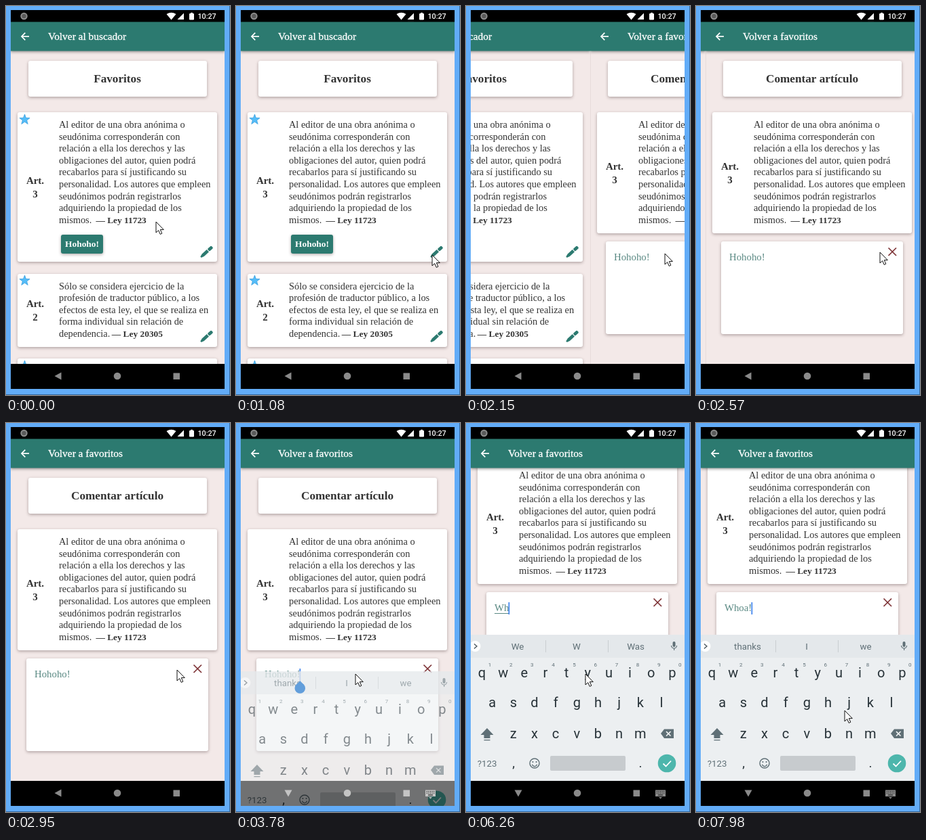
Recreate the animation shown at these times as an HTML page with a canvas. Size 330x575 px, loop 8 s.

```html
<!DOCTYPE html>
<html lang="es">
<head>
<meta charset="utf-8">
<title>Favoritos</title>
<style>
html, body { margin: 0; width: 100%; height: 100%; overflow: hidden; background: #62acf8; }
canvas { display: block; }
</style>
</head>
<body>
<canvas id="stage" width="330" height="575"></canvas>
<script>
const ctx = document.getElementById('stage').getContext('2d');
const LOOP = 8000;
const SERIF = '"Liberation Serif", serif', SANS = 'Roboto, sans-serif';
const TEAL = '#2c7a70', INK = '#333', PAPER = '#f3e9e8', CROSS = '#7f3538';
const ARTICLE_3 = [
  'Al editor de una obra anónima o', 'seudónima corresponderán con',
  'relación a ella los derechos y las', 'obligaciones del autor, quien podrá',
  'recabarlos para sí justificando su', 'personalidad. Los autores que empleen',
  'seudónimos podrán registrarlos', 'adquiriendo la propiedad de los', 'mismos.  '];
const ARTICLE_2 = [
  'Sólo se considera ejercicio de la', 'profesión de traductor público, a los',
  'efectos de esta ley, el que se realiza en', 'forma individual sin relación de',
  'dependencia. '];

// Timed states: [start, value]
const FIELD = [[0, 'Hohoho!'], [4620, 'Hohoho'], [5100, 'Hohoh'], [5170, 'Hoho'],
  [5240, 'Hoh'], [5310, 'Ho'], [5390, 'H'], [5470, ''], [5910, 'W'],
  [6230, 'Wh'], [6270, 'Who'], [6320, 'Whoa'], [6800, 'Whoa!']];
const CARET = [[0, false], [3580, true], [4520, false], [4620, true], [5750, false],
  [5910, true], [7310, false], [7740, true]];
const IDLE_WORDS = ['thanks', 'I', 'we'];
const WORDS = [[0, IDLE_WORDS], [6000, ['We', 'W', 'Was']],
  [6340, ['Who', 'Whoa', "Whoa's"]], [6840, IDLE_WORDS]];
const POINTER = [[0, 221, 319], [380, 221, 319], [1180, 292, 370], [1280, 292, 370],
  [1530, 296, 366], [1940, 296, 366], [2150, 293, 366], [2570, 271, 364],
  [2760, 266, 364], [3510, 176, 371], [7700, 176, 371], [7980, 219, 425]];

const clamp = v => Math.max(0, Math.min(1, v));
const phase = (t, from, to) => clamp((t - from) / (to - from));
const smooth = u => u * u * (3 - 2 * u);
const stateAt = (list, t) => list.reduce((value, [start, next]) => t >= start ? next : value, null);

function pointerAt(t) {
  let i = 1;
  while (i < POINTER.length - 1 && t > POINTER[i][0]) i++;
  const [t0, x0, y0] = POINTER[i - 1], [t1, x1, y1] = POINTER[i];
  const u = smooth(phase(t, t0, t1));
  return [Math.round(x0 + (x1 - x0) * u), Math.round(y0 + (y1 - y0) * u)];
}

function text(str, x, y, size, color = INK, { bold = '', family = SERIF, align = 'left' } = {}) {
  ctx.font = `${bold} ${size}px ${family}`;
  ctx.textAlign = align;
  ctx.fillStyle = color;
  ctx.fillText(str, x, y);
  return ctx.measureText(str).width;
}
const sans = (str, x, y, size, color) =>
  text(str, x, y, size, color, { family: SANS, align: 'center' });
const heading = (str, x, y, size) => text(str, x, y, size, INK, { bold: 'bold', align: 'center' });

function rect(x, y, w, h, color) {
  ctx.fillStyle = color;
  ctx.fillRect(x, y, w, h);
}
function roundRect(x, y, w, h, r, color) {
  ctx.fillStyle = color;
  ctx.beginPath();
  ctx.roundRect(x, y, w, h, r);
  ctx.fill();
}
function disc(x, y, r, color) {
  ctx.fillStyle = color;
  ctx.beginPath();
  ctx.arc(x, y, r, 0, 7);
  ctx.fill();
}
function path(points, close) {
  ctx.beginPath();
  for (let i = 0; i < points.length; i += 2) ctx.lineTo(points[i], points[i + 1]);
  if (close) ctx.closePath();
}
function poly(points, color) {
  path(points, true);
  ctx.fillStyle = color;
  ctx.fill();
}
function line(points, color, width = 1) {
  path(points);
  ctx.strokeStyle = color;
  ctx.lineWidth = width;
  ctx.stroke();
}
function layer(draw) {
  ctx.save();
  draw();
  ctx.restore();
}
function clip(x, y, w, h) {
  ctx.beginPath();
  ctx.rect(x, y, w, h);
  ctx.clip();
}
function card(x, y, w, h, color = '#fff', r = 3) {
  layer(() => {
    ctx.shadowColor = 'rgba(60,40,40,.38)';
    ctx.shadowBlur = 4;
    ctx.shadowOffsetY = 1.5;
    roundRect(x, y, w, h, r, color);
  });
}

function star(x, y) {
  const points = [];
  for (let i = 0; i < 10; i++) {
    const r = i % 2 ? 3.3 : 8, a = i * Math.PI / 5 - Math.PI / 2;
    points.push(x + r * Math.cos(a), y + r * Math.sin(a));
  }
  poly(points, '#55bdf8');
  ctx.strokeStyle = '#3c9fdd';
  ctx.lineWidth = .8;
  ctx.stroke();
}

function pencil(x, y, alpha = 1) {
  layer(() => {
    ctx.globalAlpha = alpha;
    ctx.translate(x, y);
    ctx.rotate(-.74);
    poly([-11.5, -1, -7, -2.4, 2.5, -2.4, 2.5, 2.4, -7, 2.4, -11.5, 1], TEAL);
    roundRect(3.6, -2.4, 7.6, 4.8, 1.5, TEAL);
  });
}

function article(lines, law, number, top, labelY) {
  let width = 0;
  lines.forEach((str, i) => { width = text(str, 78, top + i * 17.6, 14.35); });
  text('— Ley ' + law, 78 + width - 1, top + (lines.length - 1) * 17.6, 13.4, INK, { bold: 'bold' });
  heading('Art.', 43, labelY, 15);
  heading(number, 43, labelY + 20, 15);
}

function header(title) {
  layer(() => {
    ctx.shadowColor = 'rgba(0,0,0,.4)';
    ctx.shadowBlur = 4;
    ctx.shadowOffsetY = 1;
    rect(7, 23, 315, 43.5, TEAL);
  });
  line([34, 45, 23, 45], '#fff', 1.7);
  line([28.3, 39.7, 23, 45, 28.3, 50.3], '#fff', 1.7);
  text(title, 62, 50, 15.4, '#fff');
  ctx.strokeStyle = '#fff';
  ctx.lineWidth = .3;
  ctx.strokeText(title, 62, 50);
}

function favorites(pressed) {
  rect(7, 23, 315, 506, PAPER);
  card(33, 81, 263, 53);
  heading('Favoritos', 164, 113, 17.2);
  card(17, 157, 294, 221);
  star(27.5, 168);
  article(ARTICLE_3, '11723', '3', 180, 263);
  card(81, 338, 62, 28, TEAL);
  text('Hohoho!', 112, 356, 13.4, '#fff', { bold: 'bold', align: 'center' });
  pencil(295.5, 363.5, 1 - pressed * .5);
  card(17, 396, 294, 108);
  star(27.5, 406);
  article(ARTICLE_2, '20305', '2', 418.5, 445);
  pencil(295.5, 488.5);
  card(17, 521, 294, 60);
  star(27.5, 532);
  header('Volver al buscador');
}

function comments(t, scroll) {
  rect(7, 23, 315, 506, PAPER);
  layer(() => {
    ctx.translate(0, -scroll);
    card(33, 81, 263, 53);
    heading('Comentar artículo', 164, 113, 17.2);
    card(17, 157, 294, 179);
    article(ARTICLE_3, '11723', '3', 180, 242);
    card(30, 348, 268, 137);
    const value = stateAt(FIELD, t);
    const width = text(value, 42, 376, 14.8, '#5a8983');
    const composing = t >= 4620 && t < 6800;
    if (composing) rect(42, 379, width, 1, '#5a8983');
    if (stateAt(CARET, t)) rect(Math.round(41.5 + width) - .5, 363, 1.7, 18, '#3c82ee');
    line([276.5, 357.5, 288, 369], CROSS, 1.7);
    line([288, 357.5, 276.5, 369], CROSS, 1.7);
  });
  header('Volver a favoritos');
}

function caretHandle(scroll) {
  const y = 392 - scroll;
  poly([94.3, y - 11, 100, y - 5, 88.6, y - 5], '#629edb');
  disc(94.3, y, 7.8, '#629edb');
}

function keyRow(letters, x, y, caps) {
  [...letters].forEach((key, i) =>
    sans(caps ? key.toUpperCase() : key, x + i * 31.15, y, 20, '#273238'));
}

function keyboard(t) {
  const grey = '#5f6f76', caps = t >= 6730 && t < 6870;
  rect(7, 313, 315, 253, '#eceff1');
  rect(7, 313, 315, 34, '#e4e8eb');
  disc(13.5, 330, 8, '#fff');
  line([12, 326.5, 16, 330, 12, 333.5], '#4c5960', 1.4);
  stateAt(WORDS, t).forEach((word, i) => sans(word, 76 + i * 87, 335, 13.3, grey));
  rect(117, 321, 1, 18, '#c9ced1');
  rect(209, 321, 1, 18, '#c9ced1');

  roundRect(304.5, 323, 4, 8, 2, grey);
  ctx.beginPath();
  ctx.arc(306.5, 329, 4, 0, Math.PI);
  ctx.strokeStyle = grey;
  ctx.lineWidth = 1.2;
  ctx.stroke();
  rect(306, 333, 1.2, 3, grey);

  keyRow('qwertyuiop', 23.5, 376, caps);
  [...'1234567890'].forEach((n, i) => sans(n, 35 + i * 31.15, 360, 8, grey));
  keyRow('asdfghjkl', 38.7, 420, caps);
  keyRow('zxcvbnm', 69.8, 466, caps);

  poly([31, 451, 40.5, 461, 35.5, 461, 35.5, 466, 26.5, 466, 26.5, 461, 21.5, 461], grey);
  rect(26.5, 468, 9, 1.3, grey);
  poly([287, 459, 292, 452.5, 306, 452.5, 306, 466, 292, 466], grey);
  line([295, 456, 301.5, 462.5], '#fff', 1.5);
  line([301.5, 456, 295, 462.5], '#fff', 1.5);

  sans('?123', 31, 508, 13.3, grey);
  sans(',', 70, 509, 19, '#273238');
  ctx.strokeStyle = grey;
  ctx.lineWidth = 1.4;
  ctx.beginPath();
  ctx.arc(101, 503, 7, 0, 7);
  ctx.stroke();
  ctx.beginPath();
  ctx.arc(101, 504, 3.6, .2, Math.PI - .2);
  ctx.stroke();
  disc(98.4, 501, 1.1, grey);
  disc(103.6, 501, 1.1, grey);
  roundRect(124, 492, 111, 22, 2, '#c7cbce');
  sans('.', 257, 509, 19, '#273238');
  disc(296, 503, 13.3, '#4db6ac');
  line([290.5, 503.5, 294.5, 507.5, 302, 499.5], '#fff', 1.8);
}

// The keyboard fades in over the page and shows dimmed through the navigation bar.
function risingKeyboard(t) {
  const rise = phase(t, 3707, 3957);
  const part = (y, h, alpha) => layer(() => {
    clip(7, y, 315, h);
    ctx.globalAlpha = alpha;
    ctx.translate(0, Math.round(108 * (1 - rise) ** 2));
    keyboard(t);
  });
  part(66, 463, phase(t, 3707, 3840));
  part(529, 37, 1);
  rect(7, 529, 315, 37, `rgba(0,0,0,${1 - .6 * Math.sin(Math.PI * rise)})`);
}

function statusBar() {
  rect(7, 6, 315, 17.5, '#000');
  disc(26.5, 15, 5.2, '#8c8c8c');
  disc(26.5, 15, 3.2, '#5a5a5a');
  ctx.fillStyle = '#fff';
  ctx.beginPath();
  ctx.moveTo(243.5, 20.5);
  ctx.lineTo(236.5, 12);
  ctx.quadraticCurveTo(243.5, 7.5, 250.5, 12);
  ctx.fill();
  poly([252.5, 20, 262, 20, 262, 10.5], '#fff');
  roundRect(270, 11, 7, 9.5, 1, '#fff');
  rect(272, 9.8, 3, 2, '#fff');
  text('10:27', 282.5, 19, 10.7, '#fff', { bold: '500', family: SANS });
}

function navIcons(t) {
  const typing = t >= 3707;
  const grey = typing && t < 3957 ? '#c4c4c4' : '#8a8a8a';
  if (typing) {
    poly([71.5, 542.5, 82.5, 542.5, 77, 552.5], grey);
    rect(279, 542.5, 15, 9.5, grey);
    for (let i = 0; i < 10; i++) {
      rect(280.7 + i % 5 * 2.6, 544 + Math.floor(i / 5) * 2.5, 1.2, 1.2, '#222');
    }
    rect(283, 549.3, 7, 1.2, '#222');
    poly([284, 553, 289, 553, 286.5, 555.5], grey);
  } else {
    poly([71.5, 547, 81.5, 541.5, 81.5, 552.5], grey);
  }
  disc(164, 547, 5.3, grey);
  rect(246.5, 542.5, 9.5, 9.5, grey);
}

function pointer([x, y]) {
  path([x, y, x, y + 16, x + 3.7, y + 12.6, x + 6.2, y + 18.4, x + 8.8, y + 17.2,
    x + 6.3, y + 11.6, x + 11.3, y + 11.6], true);
  ctx.fillStyle = '#fff';
  ctx.fill();
  ctx.strokeStyle = '#111';
  ctx.lineWidth = 1;
  ctx.stroke();
}

function draw(t) {
  const slide = t < 1902 ? 0 : t >= 2760 ? 1 : 1 - Math.exp(-(((t - 1902) / 330) ** 1.9));
  const shift = Math.round(slide * 315);
  const pressed = phase(t, 1400, 1530) * (1 - phase(t, 1600, 1690));
  const scroll = Math.round(98 * smooth(phase(t, 3930, 4190)));

  rect(0, 0, 330, 575, '#62acf8');
  rect(0, 574, 330, 1, '#35689c');
  rect(329, 0, 1, 575, '#35689c');
  rect(7, 6, 315, 560, '#000');
  layer(() => {
    clip(7, 23, 315, 506);
    if (shift < 315) layer(() => {
      ctx.translate(-shift, 0);
      favorites(pressed);
    });
    if (shift > 0) layer(() => {
      ctx.translate(315 - shift, 0);
      clip(7, 23, 315, 506);
      comments(t, scroll);
      if (shift < 315) rect(7, 67, 1, 462, 'rgba(90,60,60,.07)');
    });
  });
  statusBar();
  if (t >= 3707) risingKeyboard(t);
  if (t >= 3580 && t < 4620) caretHandle(scroll);
  navIcons(t);
  pointer(pointerAt(t));
}

let start;
function frame(now) {
  start ??= now;
  draw((now - start) % LOOP);
  requestAnimationFrame(frame);
}
draw(0);
requestAnimationFrame(frame);
</script>
</body>
</html>
```
